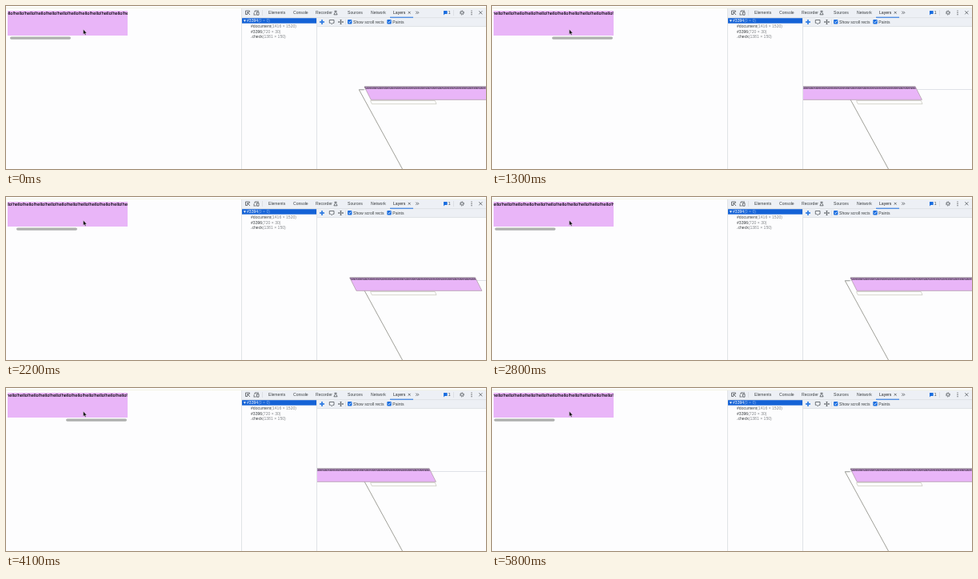
An HTML page for the animation above (6 s loop, 600 by 204 pixels).

```html
<!DOCTYPE html>
<html lang="en">
<head>
<meta charset="utf-8">
<title>Layers panel while scrolling</title>
<style>
html, body { margin: 0; width: 100%; height: 100%; overflow: hidden; background: #fdfdfe; }
svg { display: block; width: 600px; height: 204px; }
text { font-family: "Liberation Sans", Arial, sans-serif; font-size: 5.1px; fill: #3c4043; white-space: pre; }
.rule { stroke: #d9dce0; stroke-width: .8; fill: none; }
.icon { stroke: #50555a; stroke-width: .8; fill: none; }
.blue { fill: #1a6ee0; }
#strip text { font-size: 5.74px; fill: #120c16; stroke: #120c16; stroke-width: .12; }
</style>
</head>
<body>
<svg viewBox="0 0 600 204">
  <defs>
    <clipPath id="scroller"><rect x="2" y="6" width="150" height="31"/></clipPath>
    <clipPath id="view"><rect x="389" y="26" width="211" height="178"/></clipPath>
    <g id="strip">
      <rect width="288" height="31" fill="#e9b5f8"/>
      <text id="words" x="0" y="4.8"></text>
    </g>
  </defs>

  <!-- page -->
  <rect width="600" height="204" fill="#fdfdfe"/>
  <g clip-path="url(#scroller)"><use id="content" href="#strip"/></g>
  <rect id="thumb" y="38.4" width="76" height="3.4" rx="1.7" fill="#aeb0ae"/>
  <path d="M96.600 29.200v6.200l1.400-1.200 1 2.300 1-.4-1-2.200h1.900z" fill="#111" stroke="#fff" stroke-width=".3"/>

  <!-- tool panel -->
  <rect x="295" y="3" width="305" height="11.500" fill="#edf0f5"/>
  <rect x="389" y="15" width="211" height="10.500" fill="#edf0f5"/>
  <path d="M0 2.500H600" stroke="#f0f0dc" stroke-width=".8"/>
  <path class="rule" d="M294.500 3V204M295 14.600H600M388.500 15V204M389 25.600H600"/>
  <path class="icon" d="M302 10.500H299.500V6H304.500V7.500M301.800 7.800L305 11M301.800 10V7.800H304M311 8V6H316M310 10.500V8.500M309.500 11H312.500M313.500 7.500H316V11.200H313.500z"/>
  <path class="rule" d="M320.500 5V12M559.500 5V12"/>
  <g id="labels"></g>
  <path class="icon" d="M410.600 6.300h2.800M411.200 6.300v2l-1.300 2.500h4.200l-1.300-2.500v-2"/>
  <path class="icon" d="M502.800 6.900l2.800 2.800m0-2.800l-2.800 2.800M591.300 6.300l4 4m0-4l-4 4M512.300 6.700l1.600 1.600-1.600 1.600m2-3.200l1.600 1.600-1.600 1.600"/>
  <rect class="blue" x="480" y="13.700" width="29" height="1"/>
  <path class="blue" d="M547 6h4.600v4h-3.200l-1.400 1.400z"/>
  <circle class="icon" cx="570" cy="8.400" r="1.700"/>
  <circle class="icon" cx="570" cy="8.400" r="2.600" stroke-dasharray="1 1.040"/>
  <path d="M582 6.100h.01M582 8.400h.01M582 10.700h.01" stroke="#3c4043" stroke-width="1.200" stroke-linecap="round"/>

  <path d="M395 17v6M392 20h6" stroke="#1a6ee0" stroke-width="1.500"/>
  <path class="icon" d="M405.500 21.300H404.300V17.500H410V21.300H408.800M405.800 21.200L407.200 22.800 408.600 21.200"/>
  <path class="icon" d="M418.500 17v6M415.500 20h6M417.500 18l1-1 1 1M417.500 22l1 1 1-1M416.500 19l-1 1 1 1M420.500 19l1 1-1 1"/>
  <path class="rule" d="M424.500 16.500V23.500"/>
  <rect class="blue" x="427" y="17" width="5.400" height="5.400" rx="1"/>
  <rect class="blue" x="476.300" y="17" width="5.400" height="5.400" rx="1"/>
  <path d="M428.200 19.800l1.100 1.100 2-2.500M477.500 19.800l1.100 1.100 2-2.500" stroke="#fff" stroke-width=".8" fill="none"/>

  <rect x="295" y="15.200" width="93" height="6.500" fill="#1462d6"/>
  <path d="M296.800 17.200h3.200l-1.600 2.700z" fill="#e8f0fa"/>
  <g id="tree"></g>

  <!-- 3D view -->
  <g clip-path="url(#view)">
    <path d="M441.300 104.500H600" stroke="#d3d7e0" stroke-width=".7"/>
    <path d="M447.500 104.800H441.300L495.500 204" stroke="#77776e" stroke-width=".7" fill="none"/>
    <g id="layer">
      <use href="#strip" transform="matrix(.545 0 .267 .53 0 101)"/>
      <path d="M0 101H157L165.200 117.300H8.200z" fill="none" stroke="#9c8f92" stroke-width=".6"/>
      <path d="M0 101.200H157" stroke="#5d4f66" stroke-width=".7"/>
    </g>
    <path d="M455.500 118.500H536.300L538 122.600H457.300z" fill="#fdfdfe" stroke="#c6c6ba" stroke-width=".7"/>
  </g>
</svg>
<script>
const LOOP = 6000, STEP = 100;
const $ = id => document.getElementById(id);

// [time, left edge of the scrollbar thumb]
const path = [
  [0, 5], [100, 12], [300, 34], [500, 57], [600, 66], [700, 71], [900, 75],
  [1400, 75], [1500, 72], [1600, 64], [1700, 54.5], [1800, 46], [2000, 27],
  [2200, 13], [2400, 5], [2600, 2.5], [2700, 2.5],
  [2800, 3.5], [3000, 13], [3300, 38], [3600, 61], [3800, 71], [4000, 75],
  [4200, 75], [4300, 68], [4500, 44], [4700, 19], [4800, 8], [4900, 2.5], [6000, 2.5]
];

function thumbAt(t) {
  t = (t + LOOP) % LOOP;
  const i = path.findIndex(p => p[0] > t);
  const [t0, x0] = path[i - 1], [t1, x1] = path[i];
  return x0 + (x1 - x0) * (t - t0) / (t1 - t0);
}

function label(parent, x, y, str, fill) {
  const el = document.createElementNS("http://www.w3.org/2000/svg", "text");
  el.setAttribute("x", x);
  el.setAttribute("y", y);
  el.textContent = str;
  if (fill) el.style.fill = fill;
  parent.append(el);
  return el;
}

function node(y, x, name, size, nameFill, sizeFill = "#85888c") {
  const el = label($("tree"), x, y, name, nameFill);
  const dim = document.createElementNS(el.namespaceURI, "tspan");
  dim.textContent = `(${size})`;
  dim.style.fill = sizeFill;
  el.append(dim);
}

[[328, "Elements"], [359, "Console"], [387, "Recorder"], [427, "Sources"],
 [456, "Network"], [484, "Layers", "#202124"], [552.7, "1"]]
  .forEach(([x, str, fill]) => label($("labels"), x, 10.2, str, fill));
label($("labels"), 434, 21.6, "Show scroll rects");
label($("labels"), 483.3, 21.6, "Paints");

node(20.2, 301, "#3394", "0 × 0", "#fff", "#8fb7ef");
node(26.9, 306, "#document", "1416 × 1520");
node(33.5, 306, "#3396", "720 × 30");
node(40.1, 306, ".check", "1381 × 150");

$("words").textContent = "hello!".repeat(21);

function draw(now) {
  const t = Math.floor(now % LOOP / STEP) * STEP;
  const x = thumbAt(t);
  // the 3D view lags one step behind the page
  const layerX = 448 - (thumbAt(t - STEP) - 2.5) * 1.045;
  $("thumb").setAttribute("x", x);
  $("content").setAttribute("transform", `translate(${2 - (x - 2) * 1.89} 6)`);
  $("layer").setAttribute("transform", `translate(${layerX} 0)`);
}

const start = performance.now();
function tick() {
  draw(performance.now() - start);
  requestAnimationFrame(tick);
}
tick();
</script>
</body>
</html>
```
